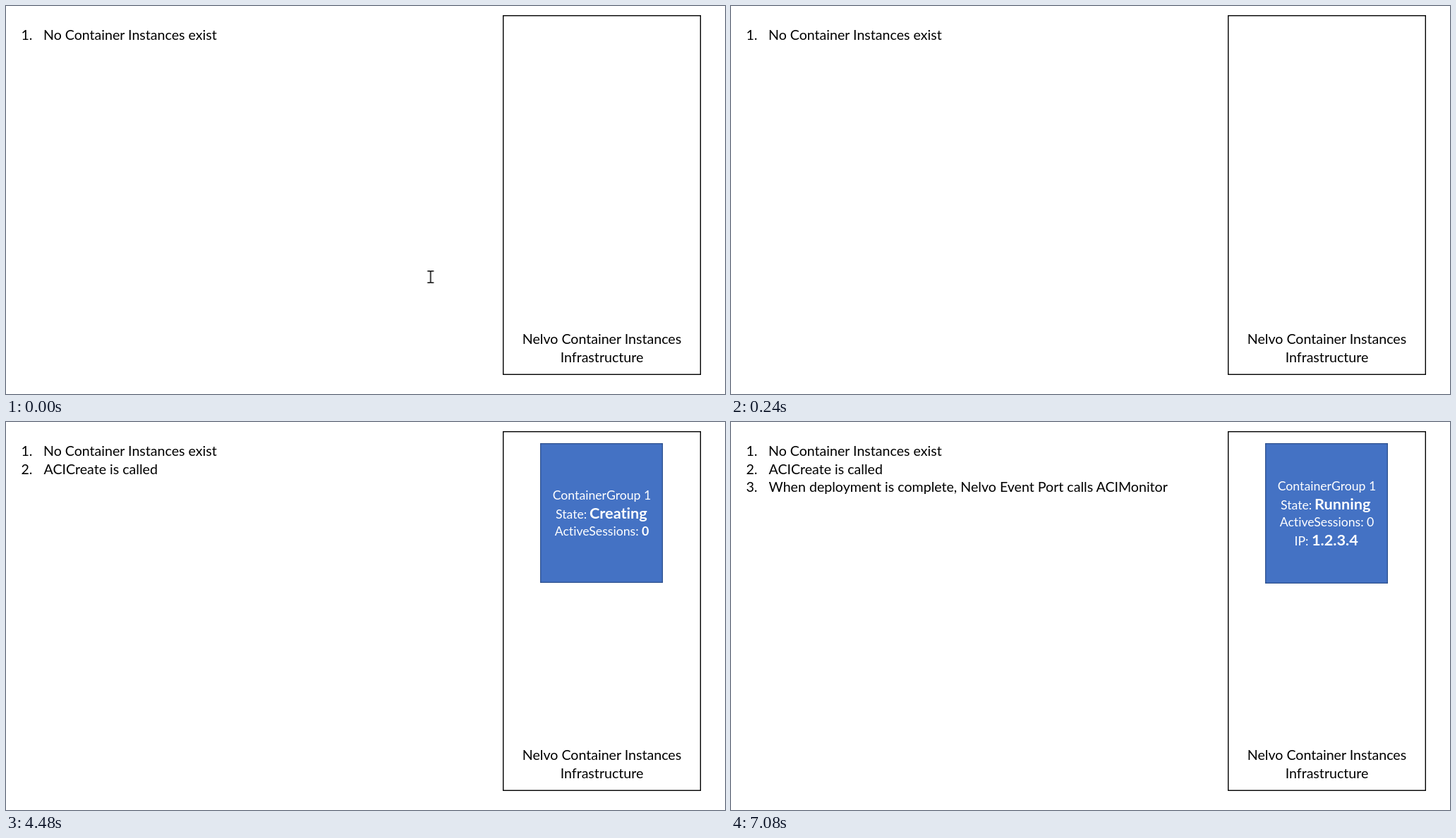
Animation, 1019 px wide and 550 px high, one loop 8000 ms. Source, as an HTML page:

```html
<!DOCTYPE html>
<html lang="en">
<head>
<meta charset="utf-8">
<title>Container group lifecycle</title>
<style>
  html, body { margin: 0; width: 100%; height: 100%; overflow: hidden; background: #fff; }
  svg { display: block; width: 1019px; height: 550px; }
  text {
    font-family: Lato, "Open Sans", sans-serif;
    font-size: 19.6px;
    font-variant-ligatures: none;
    white-space: pre;
  }
  .mid { text-anchor: middle; }
  .frame { fill: none; stroke: #000; stroke-width: 1.4; }
  .card rect { fill: #4472c4; stroke: #2f528f; stroke-width: 1.3; }
  .card text { fill: #fff; font-size: 17.65px; }
  .card .big { font-size: 21.7px; }
  .bold { font-weight: 700; }
  #cursor { fill: none; stroke: #000; stroke-width: 1.5; }

  .step { animation: 8s step-end infinite; }
  #cursor { animation-name: cursor; }
  .called { animation-name: called; }
  .creating { animation-name: creating; }
  .running { animation-name: running; }

  @keyframes cursor {
    0% { transform: translate(601.75px, 384px); visibility: visible; }
    1.5% { transform: translate(610.75px, 381px); visibility: visible; }
    3%, 100% { transform: translate(610.75px, 381px); visibility: hidden; }
  }
  @keyframes called {
    0% { visibility: hidden; }
    33%, 100% { visibility: visible; }
  }
  @keyframes creating {
    0% { visibility: hidden; }
    33% { visibility: visible; }
    71.25%, 100% { visibility: hidden; }
  }
  @keyframes running {
    0% { visibility: hidden; }
    71.25%, 100% { visibility: visible; }
  }
</style>
</head>
<body>
<svg viewBox="0 0 1019 550">
  <text y="48"><tspan x="21.5">1.</tspan><tspan x="53">No Container Instances exist</tspan></text>
  <text y="74" class="step called"><tspan x="21.5">2.</tspan><tspan x="53.5">ACICreate is called</tspan></text>
  <text y="99" class="step running"><tspan x="21.5">3.</tspan><tspan x="53.5">When deployment is complete, Nelvo Event Port calls ACIMonitor</tspan></text>

  <rect class="frame" x="704.7" y="13.7" width="279.6" height="508.6"/>
  <text class="mid" x="844.5" y="479">Nelvo Container Instances</text>
  <text class="mid" x="844.5" y="505">Infrastructure</text>

  <g class="card step creating">
    <rect x="757.65" y="30.65" width="172.7" height="196.7"/>
    <text class="mid" x="844.5" y="110">ContainerGroup 1</text>
    <text y="137"><tspan x="779">State:</tspan><tspan x="827" class="bold big">Creating</tspan></text>
    <text class="mid" x="844.5" y="161">ActiveSessions: <tspan class="bold">0</tspan></text>
  </g>

  <g class="card step running">
    <rect x="757.65" y="30.65" width="172.7" height="197.7"/>
    <text class="mid" x="844.5" y="96.5">ContainerGroup 1</text>
    <text y="123.5"><tspan x="779">State:</tspan><tspan x="827" class="bold big">Running</tspan></text>
    <text class="mid" x="844.5" y="148">ActiveSessions: 0</text>
    <text y="174.5"><tspan x="798.5">IP:</tspan><tspan x="823" class="bold big">1.2.3.4</tspan></text>
  </g>

  <path id="cursor" class="step" d="M-4.5-8.25H-1L0-7.5L1-8.25H4.5M0-7.5V7.5M-4.5 8.25H-1L0 7.5L1 8.25H4.5"/>
</svg>
</body>
</html>
```
